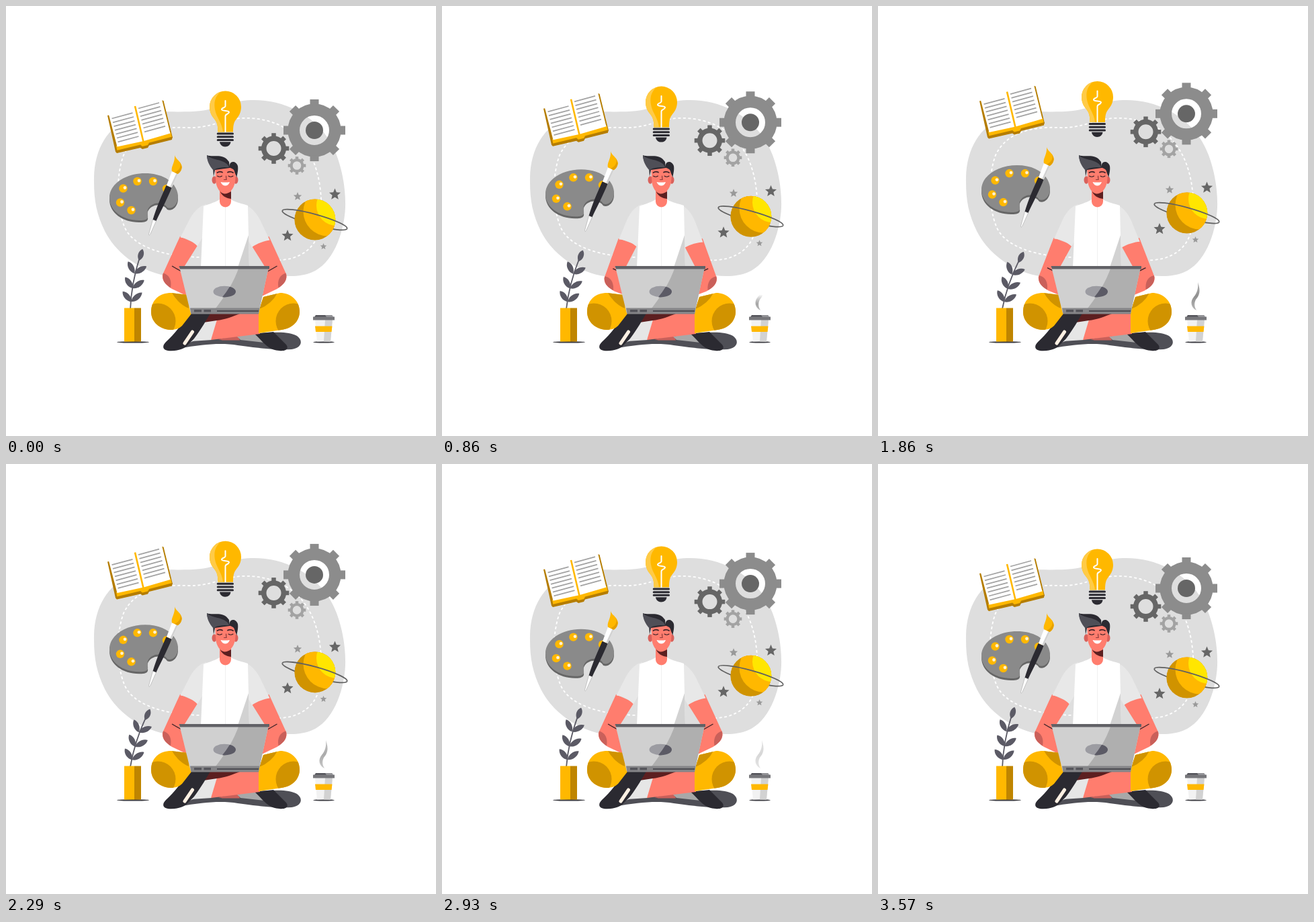
These frames come from a looping animation (640 px wide and 640 px high, 3.64 s). An HTML page:

```html
<!DOCTYPE html>
<html lang="en">
<head>
<meta charset="utf-8">
<title>Creative thinking</title>
<style>
html, body { margin: 0; width: 100%; height: 100%; overflow: hidden; background: #fff; }
svg { display: block; width: 100vw; height: 100vh; }
</style>
</head>
<body>
<svg viewBox="0 0 640 640">
  <defs>
    <clipPath id="globe"><circle cx="459.800" cy="318" r="30.500"/></clipPath>
    <clipPath id="bulbClip"><path id="bulbShape" d="M315.500 187.500C315.500 178 314 173 310 168C305.500 163 303 157 303 150A23.500 23.500 0 0 1 350 150C350 157 347.500 163 343 168C339 173 338 178 338 187.500Z"/></clipPath>
    <clipPath id="kneeL"><path id="kneeLShape" d="M216 455C216 437 229 427 246 427L270 430 276 458 262 476C257 481 250 482 245 482C228 481 216 470 216 455Z"/></clipPath>
    <clipPath id="kneeR"><path id="kneeRShape" d="M437 455C437 437 422 427 408 427L383 433 376 455 376 487 410 482C426 480 437 469 437 455Z"/></clipPath>
    <linearGradient id="reveal" gradientUnits="userSpaceOnUse" x1="0" y1="0" x2="0" y2="14">
      <stop offset="0" stop-color="#000"/><stop offset="1" stop-color="#fff"/>
    </linearGradient>
    <linearGradient id="vapour" x1="0" y1="0" x2="0" y2="1">
      <stop offset="0" stop-color="#b4b4b4"/><stop offset=".5" stop-color="#909090"/><stop offset="1" stop-color="#b8b8b8"/>
    </linearGradient>
    <mask id="steamMask" maskUnits="userSpaceOnUse" x="450" y="400" width="50" height="60">
      <rect x="450" y="400" width="50" height="60" fill="url(#reveal)"/>
    </mask>
    <g id="limb">
      <path fill="#ff7d6e" d="M259 343L286 355 264 390 272 433 247 421C238 415 232 409 233 400Z"/>
      <path fill="#c9605a" d="M234 397.500C243 400 247 408 245 419.500C237 414 231 408 234 397.500Z"/>
      <path stroke="#3a2228" stroke-width="1.300" d="M247 387L261 395"/>
    </g>
  </defs>

  <path fill="#dedede" d="M131 262C130 215 150 180 188 164C215 153 255 160 290 156C320 152 335 141 365 140C415 139 455 162 478 195C497 222 506 265 505 300C503 341 485 384 456 396C430 408 390 400 350 390L300 390C285 402 255 405 235 401C195 392 162 365 147 335C135 310 131 290 131 262Z"/>
  <path fill="none" stroke="#fff" stroke-width="1.800" stroke-dasharray="4 3.500" d="M390 378C440 382 464 358 468 325C472 285 468 235 440 202C420 178 386 165 350 167C322 169 305 182 270 181C225 179 190 190 175 222C163 255 165 300 176 328C188 358 235 374 295 374"/>

  <g id="book">
    <path fill="#b57d00" d="M151 163L155 162 168 210 165 219 163 217ZM231 140L234.500 141 248 196 246 198Z"/>
    <path fill="#ffb800" d="M164 208L245 188 247 196 213 204 211 208 202 210 200 207 165.500 216Z"/>
    <path fill="#b57d00" d="M164.500 215L200 206.500 203 209 211 207 213 203.500 247.500 194.500 247 199 213 207.500 211 211 203 213 200 211 165 219Z"/>
    <path fill="#fff" d="M153 162L192 150.500 232 139 244.500 189.500 205 201 165.500 209.500Z"/>
    <path id="print" fill="none" stroke="#a3a3a3" stroke-width="1.800"/>
    <path fill="none" stroke="#ffb800" stroke-width="2.600" d="M192 149L204.500 202"/>
  </g>

  <g id="art">
    <path id="board" fill="#666" transform="translate(0 3)" d="M154 285C154 265 178 249 207 249C238 249 256 266 256 284C256 297 246 303 240 300C234 290 216 291 211 303C209 310 215 316 206 318.500C178 322 154 307 154 285Z"/>
    <g id="paints"/>
    <path fill="#fff" d="M247 246L256 250 246.500 270.500 239 267Z"/>
    <path fill="#d2d2d2" d="M253.500 249L256 250 246.500 270.500 244 269.500Z"/>
    <path fill="#ffb800" d="M251 222C253 229 261 231 262 240C261 246 258 248 255.500 250L247 246C245 239 252 233 251 222Z"/>
    <path fill="#e5a000" d="M258 232C262 238 258 245 251 247.500L255.500 250C261 247 264 239 258 232Z"/>
    <path fill="#2b2a31" d="M238.500 267L246.500 270.500C241 285 231 304 223.500 320L218.500 318C224 299 232 282 238.500 267Z"/>
    <path fill="#fff" stroke="#999" stroke-width=".5" d="M218.500 318L223.500 320 214.500 340C213 342 212 341 213 338Z"/>
  </g>

  <g id="bulb">
    <use href="#bulbShape" fill="#ffb800"/>
    <path clip-path="url(#bulbClip)" fill="#ffcb47" d="M300 120H335C315 126 308 138 311 154C313 166 322 174 323 188H300Z"/>
    <path fill="none" stroke="#fff" stroke-width="2" stroke-linecap="round" d="M326.500 141V149C326 152 321 151 321 154C322 157 332 155 332 158C331 162 326.500 160 326.500 164V187"/>
    <path stroke="#2b2a31" stroke-width="3" stroke-linecap="round" d="M315.200 190H337.500M315.200 194.700H337.500M315.200 199.400H337.500"/>
    <path fill="#2b2a31" d="M318 202.300H334.500C334 206.500 331 209.500 326 209.500C322 209.500 318.500 206.500 318 202.300Z"/>
  </g>

  <g id="gears"/>

  <g id="space">
    <g id="stars"/>
    <g fill="none" stroke="#616161" stroke-width="1.800" transform="rotate(15.500 459.500 318)">
      <path d="M409.500 318A50 8 0 0 0 509.500 318"/>
    </g>
    <g clip-path="url(#globe)">
      <circle cx="460" cy="318" r="31" fill="#d09300"/>
      <circle cx="479" cy="306" r="36.500" fill="#ffb800"/>
      <circle cx="492" cy="297" r="30" fill="#ffe600"/>
    </g>
    <g fill="none" stroke="#616161" stroke-width="1.800" transform="rotate(15.500 459.500 318)">
      <path d="M409.500 318A50 8 0 0 1 509.500 318"/>
    </g>
  </g>

  <ellipse cx="189" cy="500.300" rx="24" ry="1.200" fill="#3a3a40"/>
  <g id="plant" fill="#5b5a65">
    <path fill="none" stroke="#5b5a65" stroke-width="1.800" d="M185 452C186 424 192 396 199 374"/>
  </g>
  <path fill="#ffb800" d="M176 449.500H191V499.500H176Z"/>
  <path fill="#bf8500" d="M191 449.500H201V499.500H191Z"/>

  <g id="steam" mask="url(#steamMask)">
    <path fill="url(#vapour)" d="M476 411C481 425 478 431 473 437C470 443 471 448 474 453C466 449 464 440 470 433C475 427 477 420 476 411Z"/>
  </g>
  <ellipse cx="473" cy="500.300" rx="16" ry="1.200" fill="#3a3a40"/>
  <path fill="#f2f2f2" d="M460 467H486L483 499.500H463Z"/>
  <path fill="#d2d2d2" d="M475 467H486L483 499.500H473Z"/>
  <path fill="#ffb800" d="M460 476.500H485.500L484.500 485H461Z"/>
  <path fill="#55555b" d="M461 460H485L487 463H459Z"/>
  <path fill="#77777b" d="M457 462.500H489V467.500H457Z"/>
  <path fill="#929296" d="M475 460H485L487 463H477Z"/>

  <path fill="#4f4f56" d="M245 512.500C290 503 320 501 345 505C380 510 405 512 425 511C440 509 443 498 433 491C425 486 410 485 395 486L300 490Z"/>
  <path fill="#c9605a" d="M316 496L345 490 348 497.500 322 497.500Z"/>
  <path fill="#a8a8a8" d="M344 492L372 486 385 501 349 497Z"/>
  <path fill="#2b2a31" d="M370 488L398 485 417 504C422 511 415 514 407 513C388 512 382 498 370 488Z"/>

  <g id="armL">
    <use href="#limb"/>
    <path fill="#e8e8e8" d="M298 295C286 298 278 308 272 320L259.500 344.500C268 345 278 350 285 357.500L296 338Z"/>
  </g>
  <g transform="matrix(-1 0 0 1 650.500 0)">
    <g id="armR">
      <use href="#limb"/>
      <path fill="#e8e8e8" d="M298 295C286 298 278 307 272 319L258 348.500C266 349.500 276 353 284.500 359L296 338Z"/>
    </g>
  </g>

  <path fill="#fff" d="M318 288C310 293 298 296 294 298L290 389H362L360 297C352 294 343 293 335 288Z"/>
  <path stroke="#efefef" d="M326.500 300V388"/>
  <path fill="#d2d2d2" d="M361 341L345 389H362Z"/>

  <path fill="#ff7d6e" d="M318 270H335V291A8.500 8.500 0 0 1 318 291Z"/>
  <path fill="#5c1f20" d="M318 274C323 278 329 280 335 276V287C327 286 320 282 318 274Z"/>
  <ellipse cx="310" cy="259" rx="3.500" ry="5.800" fill="#d9615b"/>
  <ellipse cx="342" cy="259" rx="3.500" ry="5.800" fill="#d9615b"/>
  <path fill="#ff7d6e" d="M311 240H343L341 262C339 272 333 279.500 325 279.500C318 278 314 271 312.500 263Z"/>
  <path fill="#2b2a31" d="M299 222C309 226 323 218 332 232L333 241 311 244 309 254 308 240C302 234 299 228 299 222Z"/>
  <path fill="#4f4f57" d="M299 222C304 228 316 228 324 232C329 234.500 331 237 332 240C322 240 313 240 309 245C302 237 299 230 299 222Z"/>
  <path fill="#2b2a31" d="M333 236C334 231 342 230 345 238C346 245 344 250 343.500 255L340.500 248C340 242 335 242 332 240Z"/>
  <g fill="none" stroke="#3a2228" stroke-linecap="round">
    <path stroke-width="1.800" d="M314.500 248Q318 245.500 322 247.500M330 247.500Q334 245.500 338 248"/>
    <path stroke-width="1.100" d="M314.500 253Q318 255.500 321.500 253M331 253Q334.500 255.500 338 253"/>
    <path stroke="#8c3a3a" stroke-width="1.200" d="M327.500 253L328 258.500H324.500"/>
  </g>
  <path fill="#fff" d="M319.500 262Q326 263 333 262Q331 267.500 326 267.500Q321.500 267 319.500 262Z"/>

  <path fill="#e6e6e6" d="M275 499L298 468 316 465 306 497Z"/>
  <path fill="#ff7d6e" d="M314 467L340 457H378V488L305 497Z"/>
  <path fill="#5c1f20" d="M298 458H348C338 462 325 467 314 468L294 471Z"/>
  <path fill="#2b2a31" d="M272 456H305C299 466 290 482 280 495L268 507C262 512 250 514 241 513C233 512 232 506 238 500C252 487 262 474 272 456Z"/>
  <path fill="none" stroke="#fff0e3" stroke-width="5" stroke-linecap="round" d="M266 502L277.500 485"/>

  <use href="#kneeLShape" fill="#ffb800"/>
  <g clip-path="url(#kneeL)" fill="#d09300">
    <circle cx="226" cy="469" r="26.500"/><path d="M247 427L272 428V450Q256 443 247 427Z"/>
  </g>
  <use href="#kneeRShape" fill="#ffb800"/>
  <g clip-path="url(#kneeR)" fill="#d09300">
    <circle cx="428" cy="469" r="26.500"/><path d="M404 427L380 430 377 451Q396 443 404 427Z"/>
  </g>

  <path fill="#d0d0d0" d="M258 388H391L376 457.500H275Z"/>
  <path fill="#afafaf" d="M347 388H391L376 457.500H306Q336 421 347 388Z"/>
  <path fill="#616166" d="M257.500 387H392V391.500H259Z"/>
  <path fill="#858588" d="M274 449.500H377.500L376 458.500H275.500Z"/>
  <path fill="#55555b" d="M280 452H291V455.500H280ZM294.500 452H305V455.500H294.500Z"/>
  <path stroke="#3a3a40" stroke-width="1.500" d="M314 454H376"/>
  <ellipse cx="325" cy="425" rx="16.500" ry="8.300" fill="#9c9ca2"/>
  <path fill="#5b5a65" d="M333 417.700A16.500 8.300 0 0 1 322 433.200Q328 426 333 417.700Z"/>
</svg>
<script>
const LOOP = 3640, SPAN = 3560;
const $ = id => document.getElementById(id);
const add = (id, markup) => $(id).insertAdjacentHTML('beforeend', markup);
const clamp = v => Math.min(1, Math.max(0, v));
const ease = v => { v = clamp(v); return v * v * (3 - 2 * v); };

function gear(x, y, body, tip, hole, width, color) {
  let s = `<g transform="translate(${x} ${y})" fill="${color}"><circle r="${(body + hole) / 2}" fill="none" stroke="${color}" stroke-width="${body - hole}"/>`;
  for (let a = 0; a < 360; a += 45)
    s += `<rect x="${-width / 2}" y="${-tip}" width="${width}" height="${tip - body + 2}" transform="rotate(${a})"/>`;
  return s + '</g>';
}

function star(x, y, r, color) {
  const pts = [];
  for (let i = 0; i < 10; i++) {
    const a = i * Math.PI / 5 - Math.PI / 2, q = i % 2 ? r * 0.45 : r;
    pts.push(x + q * Math.cos(a), y + q * Math.sin(a));
  }
  return `<polygon points="${pts.map(v => v.toFixed(2)).join(' ')}" fill="${color}"/>`;
}

const leaf = (x, y, angle, len) =>
  `<path transform="translate(${x} ${y}) rotate(${angle})" d="M0 0C-5.500 -5 -5.500 ${-len * 0.75} 0 ${-len}C5.500 ${-len * 0.75} 5.500 -5 0 0Z"/>`;

add('gears',
  gear(459, 185, 39.5, 46, 22, 13, '#8c8c8c') + '<circle cx="459" cy="185" r="13" fill="#666"/>' +
  gear(398.5, 212, 18.5, 22.8, 11, 6.5, '#666') +
  gear(433, 237.5, 10.5, 13.3, 6.3, 4.5, '#a3a3a3'));

add('stars', star(489.5, 280.5, 9, '#666') + star(434, 283.5, 6.5, '#999') +
  star(419, 342, 9, '#666') + star(472.5, 358, 5, '#999'));

add('plant', leaf(198, 379, 17, 18) +
  [[191, 398], [188.5, 420], [186.5, 440]].map(([x, y], i) =>
    leaf(x, y, -28 - 6 * i, 20) + leaf(x, y, 60 - 5 * i, 21)).join(''));

add('paints', [[174.5, 271.5], [195.5, 261], [219, 261], [170, 292.5], [186.5, 304], [239, 272]].map(([x, y]) =>
  `<circle cx="${x}" cy="${y}" r="6.200" fill="#ffb800"/><circle cx="${x + 2.5}" cy="${y - 1}" r="2.400" fill="#fff3d2"/>`).join(''));

// The lit face of the palette sits on top of its darker edge.
const face = $('board').cloneNode();
face.id = 'face';
face.setAttribute('fill', '#8a8a8a');
face.removeAttribute('transform');
$('board').after(face);

let lines = '';
for (let i = 0; i < 7; i++) {
  const x = i * 1.5, y = i * 5.8;
  lines += `M${157.5 + x} ${167.5 + y}l31 -8.300M${197 + x} ${152.5 + y}l31 -8.500`;
}
$('print').setAttribute('d', lines);

const lifts = { book: 21.5, art: 12, bulb: 14.5, gears: 24.8, space: 10 };

function draw(t) {
  const wave = (1 - Math.cos(2 * Math.PI * clamp(t / SPAN))) / 2;
  for (const id in lifts)
    $(id).setAttribute('transform', `translate(0 ${-lifts[id] * wave})`);
  $('plant').setAttribute('transform', `rotate(${9 * wave} 185 450)`);

  const tuck = ease(t / 560) - ease((t - 1640) / 600);
  for (const id of ['armL', 'armR'])
    $(id).setAttribute('transform', `rotate(${-4.7 * tuck} 297 300)`);

  const top = 453 - 60 * clamp((t - 290) / 1450);
  $('reveal').setAttribute('gradientTransform', `translate(0 ${top})`);
  $('steam').setAttribute('opacity', t < 290 ? 0 : 1 - clamp((t - 1900) / 1600));
}

function tick() {
  draw(performance.now() % LOOP);
  requestAnimationFrame(tick);
}
tick();
</script>
</body>
</html>
```
